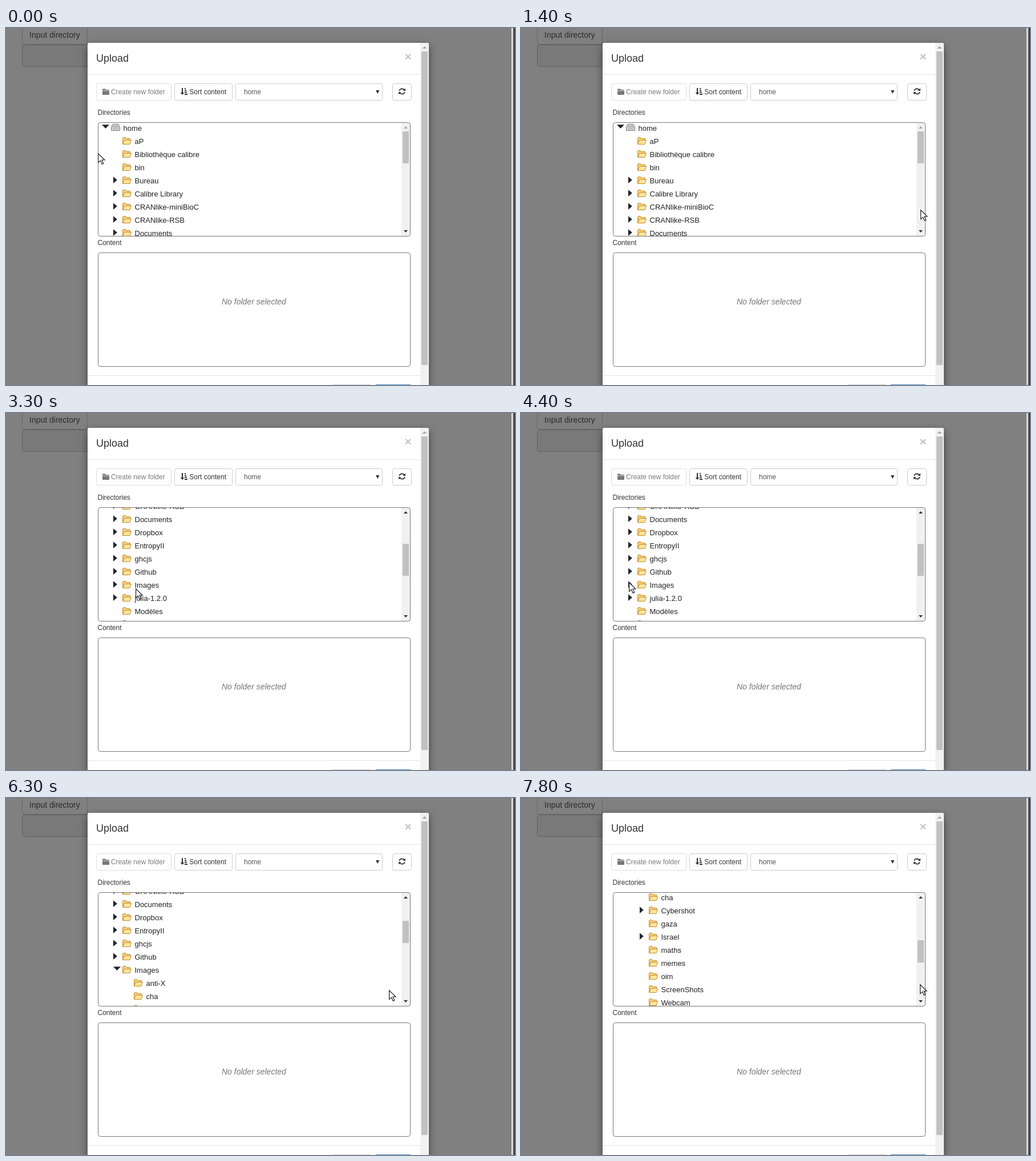
An HTML page for the animation above (8000 ms loop, 892 px wide and 625 px high).

```html
<!DOCTYPE html>
<html lang="en">
<head>
<meta charset="utf-8">
<title>Upload dialog</title>
<style>
  html, body { margin: 0; width: 100%; height: 100%; overflow: hidden; background: #808080; }
  svg { display: block; width: 892px; height: 625px; font: 12px "Liberation Sans", Arial, sans-serif; fill: #333; }
  .button { fill: #fff; stroke: #ccc; }
  .frame { fill: none; stroke: #777; }
  .track { fill: #f1f1f1; }
  .thumb { fill: #c1c1c1; }
  .row { font-size: 13px; fill: #222; }
  .arrow { fill: #22252b; }
  #dialog { filter: drop-shadow(0 5px 7px rgba(0, 0, 0, .5)); }
</style>
</head>
<body>
<svg viewBox="0 0 892 625">
  <defs>
    <clipPath id="listClip"><rect x="162" y="166" width="531" height="198"/></clipPath>
    <g id="folder" stroke="#c48a35" stroke-linejoin="round">
      <path fill="#f6cf72" d="M.5 12V1.8L1.5.5H5.5L7 2.5H13.5V5"/>
      <path fill="#ffe596" d="M.7 12.5 3.5 5.5H15.5L13 12.5Z"/>
      <path fill="none" stroke="#fff3c4" d="M4.5 6.6H14"/>
    </g>
    <g id="drive" fill="#d8d8d8" stroke="#777">
      <path d="M3 .5H13L15.5 5.5V11.5H.5V5.5Z"/>
      <path fill="none" d="M3 3.5H13M2 5.5H14M3 8.5H13" stroke="#999"/>
    </g>
  </defs>

  <rect width="892" height="625" fill="#808080"/>
  <rect x="886" width="2" height="625" fill="#f4f4f4"/>
  <rect x="890" width="2" height="625" fill="#3a3a3a"/>
  <path d="M28.5 0V24.5Q28.5 28.5 32.5 28.5H142.5V0" fill="none" stroke="#686868"/>
  <rect x="28.5" y="29.5" width="180" height="38" rx="4" fill="#797979" stroke="#606060"/>
  <text x="41" y="17" font-size="14" fill="#2b2b2b">Input directory</text>

  <path id="dialog" d="M143 640V29Q143 26 146 26H738Q741 26 741 29V640Z" fill="#fff"/>
  <path class="track" d="M726 26H738Q741 26 741 29V625H726Z"/>
  <rect class="thumb" x="728" y="41" width="11" height="549"/>
  <path d="M729.5 36H737.5L733.5 32Z" fill="#a3a3a3"/>
  <path d="M143 81.5H726M143 608.5H726" stroke="#e5e5e5"/>
  <text x="158" y="59" font-size="18">Upload</text>
  <text x="698.5" y="57" font-size="21" font-weight="bold" fill="#c4c4c4">×</text>

  <rect class="button" x="158.5" y="97.5" width="131" height="29" rx="3" style="stroke:#ddd"/>
  <path d="M169 107.5Q169 106.5 170 106.5H174L175 108H180Q181 108 181 109V109.5H169ZM169 110.3H181V116Q181 117 180 117H170Q169 117 169 116Z" fill="#777"/>
  <text x="184" y="116" fill="#7c7c7c">Create new folder</text>
  <rect class="button" x="295.5" y="97.5" width="101" height="29" rx="3"/>
  <path d="M308 105H310V113H312.3L309 117 305.7 113H308ZM313 105H315V107H313ZM313 108.3H316V110.3H313ZM313 111.6H317V113.6H313ZM313 115H318V117H313Z"/>
  <text x="321.3" y="116">Sort content</text>
  <rect class="button" x="402.5" y="97.5" width="257" height="29" rx="3"/>
  <text x="417" y="116" fill="#555">home</text>
  <path d="M648 109H654.4L651.2 115Z" fill="#333"/>
  <rect class="button" x="677.5" y="97.5" width="33" height="29" rx="3"/>
  <path d="M689.2 110Q690 106.6 694 106.4Q696.5 106.4 698 108.5M698.8 112Q698 115.4 694 115.6Q691.5 115.6 690 113.5" fill="none" stroke="#333" stroke-width="1.8"/>
  <path d="M700 105.5V110H695.5ZM688 116.5V112H692.5Z"/>

  <text x="160.5" y="152">Directories</text>
  <g id="tree" clip-path="url(#listClip)"></g>
  <rect class="track" x="693" y="166" width="15" height="198"/>
  <rect class="thumb" id="listThumb" x="695" width="11"/>
  <path id="upArrow" d="M697 176H704L700.5 172Z"/>
  <path d="M697 354H704L700.5 358Z"/>
  <rect class="frame" x="161.5" y="165.5" width="547" height="199" rx="4"/>

  <text x="160.5" y="380">Content</text>
  <rect class="frame" x="161.5" y="393.5" width="547" height="199" rx="4"/>
  <text x="378" y="484" font-size="14" font-style="italic" fill="#777">No folder selected</text>
  <path d="M573 624.5H639" stroke="#ccc"/>
  <path d="M648 624.5H709" stroke="#4485c6"/>

  <path id="cursor" d="M.6.8V16.6L4.4 13.1 7.2 19.3 9.8 18.2 7 12H12Z" fill="#fff" stroke="#111" stroke-width="1.1"/>
</svg>

<script>
const LOOP = 8000, EXPAND_AT = 5300;
const byId = id => document.getElementById(id);

// Leading "+" marks a folder that can be expanded.
const top_ = ['aP', 'Bibliothèque calibre', 'bin', '+Bureau', '+Calibre Library',
  '+CRANlike-miniBioC', '+CRANlike-RSB', '+Documents', '+Dropbox', '+EntropyII',
  '+ghcjs', '+Github', '+Images'];
const after = ['+julia-1.2.0', 'Modèles', 'Musique', 'Public'];
const images = ['anti-X', 'cha', '+Cybershot', 'gaza', '+Israel', 'maths', 'memes',
  'oim', 'ScreenShots', 'Webcam'];

// [time, x, y] of the pointer tip
const pointer = [
  [0, 161, 219], [500, 166, 221], [600, 205, 238], [700, 285, 270], [800, 395, 308],
  [900, 515, 334], [1000, 615, 341], [1100, 678, 335], [1200, 707, 325], [1300, 703, 319],
  [1400, 700, 318], [3300, 227, 307], [3400, 208, 299], [3500, 197, 294], [3600, 193, 293],
  [3800, 188, 293], [4300, 188, 295], [4400, 189, 296], [5800, 205, 297], [6000, 440, 325],
  [6100, 647, 331], [6300, 671, 336], [6400, 686, 334], [6600, 692, 332], [6700, 697, 330],
  [6800, 699, 328], [7000, 699, 326]];
// [time, offset] of the directory list
const scrolling = [[0, 0], [2000, 113], [2100, 173], [7600, 344], [7800, 346]];

const at = (steps, t) => steps.findLast(step => step[0] <= t);

function row(label, level, index, open) {
  const x = 168 + 20 * level, y = 180 + 23 * index;
  const arrow = open ? `M${x} ${y - 10.7}h13l-6.5 6.7z`
    : label[0] === '+' ? `M${x} ${y - 11.8}l6.8 5.9l-6.8 5.9z` : '';
  return `<path class="arrow" d="${arrow}"/>
    <use href="#${level ? 'folder' : 'drive'}" x="${x + 16}" y="${y - 12}"/>
    <text class="row" x="${x + 37.5}" y="${y}">${label.replace('+', '')}</text>`;
}

function buildTree(expanded) {
  const entries = [['home', 0, true], ...top_.map(name => [name, 1, expanded && name === '+Images']),
    ...(expanded ? images.map(name => [name, 2]) : []), ...after.map(name => [name, 1])];
  return '<g>' + entries.map(([name, level, open], i) => row(name, level, i, open)).join('') + '</g>';
}

byId('tree').innerHTML = buildTree(false) + buildTree(true);
const [closedTree, openTree] = byId('tree').children;

function draw() {
  const t = performance.now() % LOOP;
  const [, x, y] = at(pointer, t), [, offset] = at(scrolling, t);
  const expanded = t >= EXPAND_AT;
  closedTree.style.display = expanded ? 'none' : '';
  openTree.style.display = expanded ? '' : 'none';
  (expanded ? openTree : closedTree).setAttribute('transform', `translate(0 ${-offset})`);
  byId('listThumb').setAttribute('y', 181 + Math.round(offset * (expanded ? .197 : .276)));
  byId('listThumb').setAttribute('height', expanded ? 39 : 56);
  byId('upArrow').setAttribute('fill', offset ? '#333' : '#a3a3a3');
  byId('cursor').setAttribute('transform', `translate(${x} ${y})`);
  requestAnimationFrame(draw);
}
draw();
</script>
</body>
</html>
```
